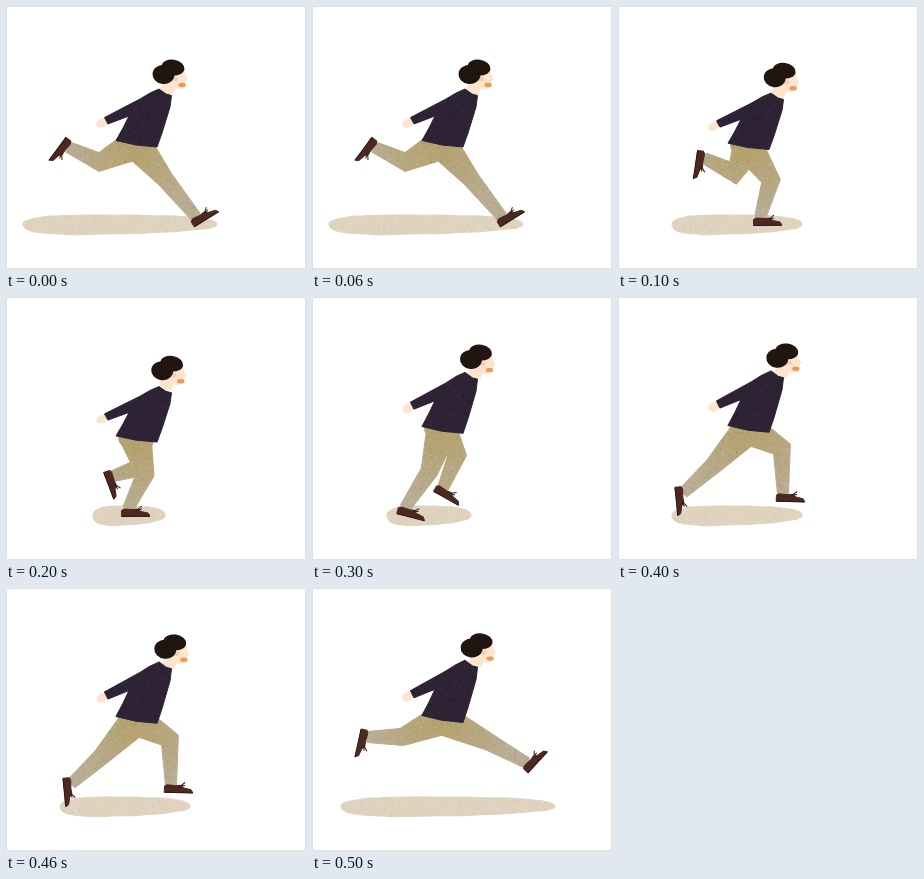
An HTML page with a canvas that plays this animation: 300 px wide and 263 px high, repeating every 0.6 s.

```html
<!DOCTYPE html>
<html lang="en">
<head>
<meta charset="utf-8">
<title>Runner</title>
<style>
html, body { margin: 0; width: 100%; height: 100%; overflow: hidden; background: #fff; }
canvas { display: block; width: 300px; height: 263px; }
</style>
</head>
<body>
<canvas id="stage"></canvas>
<script>
const W = 300, H = 263, STEP = 100;
const canvas = document.getElementById('stage');
const ctx = canvas.getContext('2d');
const ratio = window.devicePixelRatio || 1;
canvas.width = W * ratio;
canvas.height = H * ratio;

const SKIN = '#fce4cd', HAIR = '#21150f', SWEATER = '#2d2335', SHOE = '#4b2920';

// One stride: body height, shadow centre and half width, and two legs
// given by knee, ankle and the tilt of the foot in degrees.
const leg = (kx, ky, ax, ay, tilt) => ({ knee: [kx, ky], ankle: [ax, ay], tilt });
const pose = (bob, mid, half, stance, swing) => ({ bob, mid, half, stance, swing });
const stride = [
  pose(0, 114, 97, leg(159, 173, 190, 211, -31), leg(93, 156, 62, 141, 127)),
  pose(4, 119, 65, leg(153, 175, 142, 212, 0), leg(115, 167, 86, 152, 99)),
  pose(6.5, 123, 36, leg(139, 178, 122, 212, 0), leg(135, 171, 107, 179, 70)),
  pose(-7.5, 117, 42, leg(117, 175, 93, 211, 15), leg(145, 159, 131, 191, 30)),
  pose(-9, 119, 65, leg(95, 169, 65, 196, 85), leg(164, 152, 165, 197, 2)),
  pose(-10.5, 136, 107, leg(90, 149, 55, 149, 103), leg(177, 154, 215, 175, -47))
];

function rng(seed) {
  return () => (seed = seed * 16807 % 2147483647) / 2147483647;
}

function oval(x, y, rx, ry, turn, fill) {
  ctx.beginPath();
  ctx.ellipse(x, y, rx, ry, turn, 0, 7);
  ctx.fillStyle = fill;
  ctx.fill();
}

// Speckles of paper texture, light and dark in turn.
function grain(tones) {
  const rand = rng(71);
  for (let i = 0; i < 3000; i++) {
    oval(rand() * W, 40 + rand() * 195, 0.4 + rand(), 0.4 + rand(), 0, tones[i % tones.length]);
  }
}

function shape(points, fill, tones) {
  ctx.beginPath();
  points.forEach(([x, y]) => ctx.lineTo(x, y));
  ctx.closePath();
  ctx.fillStyle = ctx.strokeStyle = fill;
  ctx.lineJoin = 'round';
  ctx.lineWidth = 1;
  ctx.fill();
  ctx.stroke();
  if (!tones) return;
  ctx.save();
  ctx.clip();
  ctx.setTransform(ratio, 0, 0, ratio, 0, 0);
  grain(tones);
  ctx.restore();
}

function shadow(mid, half) {
  const soft = (v, k) => Math.sign(v) * Math.abs(v) ** k;
  const rand = rng(9), points = [];
  for (let a = 0; a < 6.28; a += 0.1) {
    const u = soft(Math.cos(a), 0.75), v = soft(Math.sin(a), 0.8);
    const taper = v > 0 ? 1 - 0.3 * u : 1 - 0.1 * u;
    points.push([mid + half * u, 218 + 9.5 * v * taper + rand() * 0.8]);
  }
  shape(points, '#dfd3bf', ['rgba(200,182,150,.2)', 'rgba(238,230,216,.25)']);
}

// Outline around hip, knee and ankle, with a mitred knee.
function limb(hip, { knee, ankle }, fill) {
  const normal = (a, b) => {
    const dx = b[0] - a[0], dy = b[1] - a[1], len = Math.hypot(dx, dy);
    return [-dy / len, dx / len];
  };
  const n = normal(hip, knee), m = normal(knee, ankle);
  const miter = 1 + n[0] * m[0] + n[1] * m[1];
  const bend = [(n[0] + m[0]) / miter, (n[1] + m[1]) / miter];
  const off = (p, d, w) => [p[0] + d[0] * w, p[1] + d[1] * w];
  shape([
    off(hip, n, 15.5), off(knee, bend, 8.5), off(ankle, m, 5.5),
    off(ankle, m, -5.5), off(knee, bend, -8.5), off(hip, n, -15.5)
  ], fill, ['rgba(130,110,65,.16)', 'rgba(222,212,188,.2)']);
}

function shoe({ ankle, tilt }) {
  ctx.save();
  ctx.translate(...ankle);
  ctx.rotate(tilt * Math.PI / 180);
  shape([[-6.5, 7.5], [-6.5, 1.5], [-4, 0], [5, 0.5], [9, 0], [13, 2.5], [20, 4], [22, 7], [8, 7]], SHOE);
  ctx.strokeStyle = '#2b1714';
  ctx.beginPath();
  for (const tip of [-3, 0]) {
    ctx.moveTo(9, 1);
    ctx.lineTo(14, tip);
  }
  ctx.moveTo(-6, 7.5);
  ctx.lineTo(22, 7.3);
  ctx.stroke();
  ctx.restore();
}

function legs({ bob, stance, swing }) {
  const hip = [130, 138 + bob * 0.64];
  const cloth = ctx.createRadialGradient(...hip, 8, ...hip, 75);
  cloth.addColorStop(0, '#b5a26f');
  cloth.addColorStop(1, '#b9ad95');
  oval(...hip, 18, 12, 0.15, cloth);
  for (const one of [stance, swing]) {
    limb(hip, one, cloth);
    shoe(one);
  }
}

// Drawn from the neck; the back stretches as the body rises.
function torso(bob) {
  ctx.save();
  ctx.translate(160, 85 + bob);
  ctx.scale(1, 1 - bob * 0.0066);
  oval(-64, 32, 6, 4.3, -0.45, SKIN);
  shape([
    [-7, -2], [0, 3], [5.5, 4.5], [4, 16], [-4, 42], [-9, 56], [-30, 54], [-50, 49.5],
    [-43, 37], [-37, 25], [-58, 33], [-61.5, 26.5], [-26, 8], [-16, 2]
  ], SWEATER, ['rgba(80,66,86,.2)', 'rgba(18,12,24,.2)']);
  ctx.restore();
}

function head(bob) {
  ctx.save();
  ctx.translate(162 - bob * 0.2, 66 + bob * 0.8);
  shape([[-4, 8], [8, 14], [4, 22], [-2, 21], [-7, 17]], SKIN);
  shape([[0, 0], [16, -1], [17, 4], [19.5, 7], [17.5, 9], [17, 15], [11, 16.5], [5, 15]], SKIN);
  oval(7, 7, 3, 2.2, 0, 'rgba(246,175,130,.45)');
  oval(14, 13, 3.6, 2.2, 0, '#ee9a52');
  oval(-4.5, 2.5, 11, 9.5, 0.1, HAIR);
  oval(5, -4.5, 11.5, 7.8, 0.15, HAIR);
  ctx.restore();
}

function draw(p) {
  ctx.setTransform(ratio, 0, 0, ratio, 0, 0);
  ctx.fillStyle = '#fff';
  ctx.fillRect(0, 0, W, H);
  ctx.strokeStyle = '#e0e0e0';
  ctx.lineWidth = 1;
  ctx.strokeRect(0.5, 0.5, W - 1, H - 1);
  shadow(p.mid, p.half);
  legs(p);
  head(p.bob);
  torso(p.bob);
}

let shown = -1;
function tick() {
  const i = Math.floor(performance.now() / STEP) % stride.length;
  if (i !== shown) draw(stride[shown = i]);
  requestAnimationFrame(tick);
}
tick();
</script>
</body>
</html>
```
